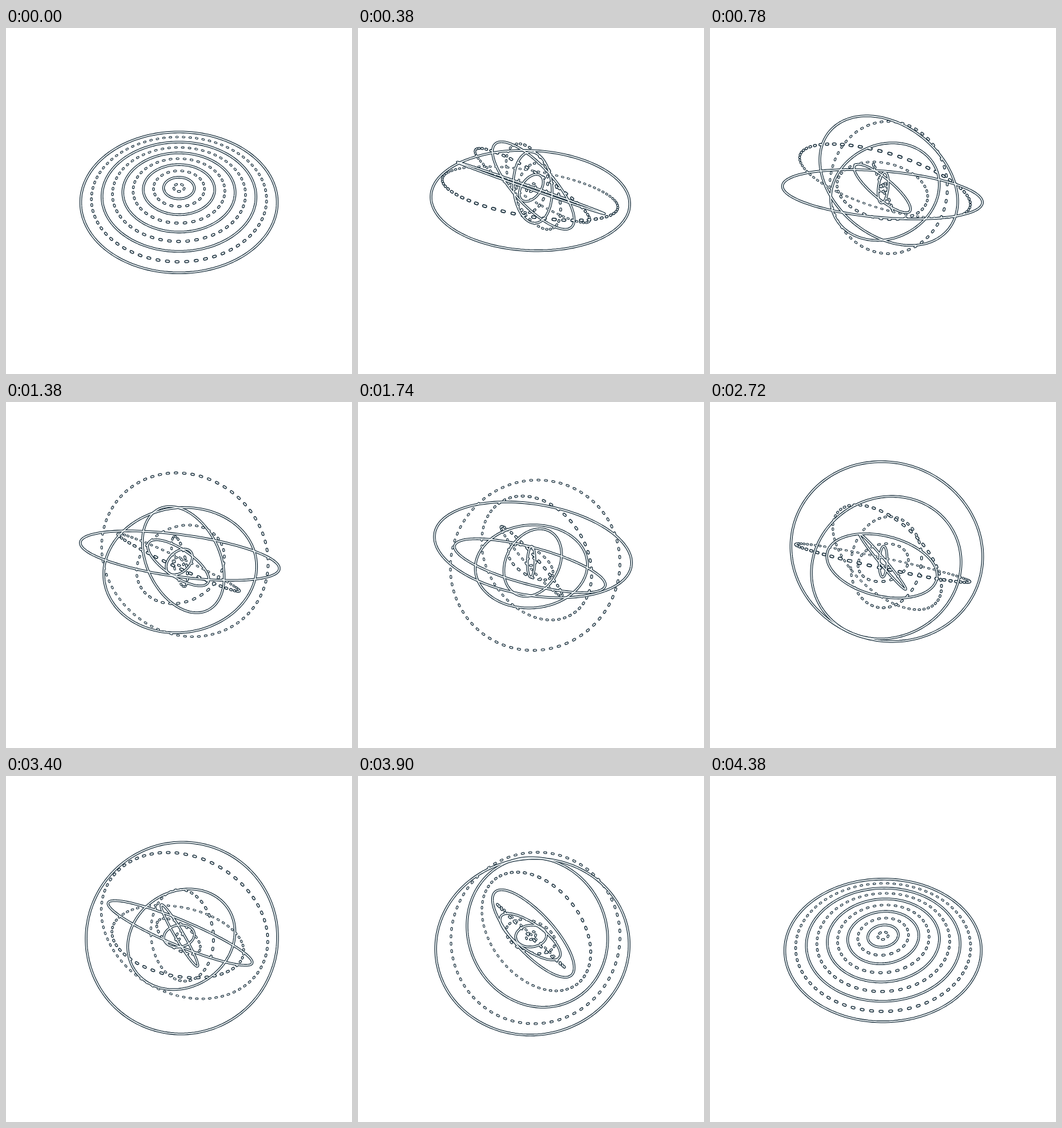
Recreate the animation shown at these times as an HTML page with a canvas. Size 540 px wide and 540 px high, loop 4.4 s.

```html
<!DOCTYPE html>
<html lang="en">
<head>
<meta charset="utf-8">
<title>Turning rings</title>
<style>
html, body { margin: 0; width: 100%; height: 100%; overflow: hidden; background: #fff; }
canvas { display: block; }
</style>
</head>
<body>
<canvas id="stage" width="540" height="540"></canvas>
<script>
const ctx = document.getElementById('stage').getContext('2d');
const TAU = Math.PI * 2, LOOP = 4400, RINGS = 10;
const CX = 270, CY = 249.2, CAMERA = 510;
const TILT = 45.5 * Math.PI / 180, SIN = Math.sin(TILT), COS = Math.cos(TILT);
const LAYERS = [{ color: '#0c2230', width: 3.9 }, { color: '#f1f6f7', width: 1.8 }];

// Ring k makes k half turns per loop about an axis in its own plane,
// and that axis is swung by 9° more from ring to ring.
function makeRing(k) {
  const swing = k * Math.PI / 20;
  return {
    k,
    radius: 150 - 15.75 * (k - 1),
    ca: Math.cos(swing),
    sa: Math.sin(swing),
    dots: k % 2 ? 0 : 5 + 8 * (RINGS - k)
  };
}

const rings = Array.from({ length: RINGS }, (_, i) => makeRing(i + 1));

function project(ring, turn, angle) {
  const u = ring.radius * Math.cos(angle), side = ring.radius * Math.sin(angle);
  const v = side * Math.cos(turn), lift = side * Math.sin(turn);
  const x = u * ring.ca - v * ring.sa;
  const front = u * ring.sa + v * ring.ca;
  const scale = 1 / (1 - (lift * COS + front * SIN) / CAMERA);
  return { x: CX + x * scale, y: CY + (front * COS - lift * SIN) * scale, scale };
}

function drawSolid(ring, turn, width) {
  const steps = 180;
  ctx.beginPath();
  for (let i = 0; i < steps; i++) {
    const p = project(ring, turn, TAU * i / steps);
    ctx.lineTo(p.x, p.y);
  }
  ctx.closePath();
  ctx.lineWidth = width;
  ctx.stroke();
}

function drawDots(ring, turn, width) {
  const half = 1.2 / ring.radius;
  for (let i = 0; i < ring.dots; i++) {
    const angle = TAU * i / ring.dots;
    const a = project(ring, turn, angle - half);
    const b = project(ring, turn, angle + half);
    ctx.beginPath();
    ctx.moveTo(a.x, a.y);
    ctx.lineTo(b.x, b.y);
    ctx.lineWidth = width * a.scale;
    ctx.stroke();
  }
}

function draw() {
  const phase = performance.now() % LOOP / LOOP;
  ctx.fillStyle = '#fff';
  ctx.fillRect(0, 0, 540, 540);
  ctx.lineCap = ctx.lineJoin = 'round';
  for (const { color, width } of LAYERS) {
    ctx.strokeStyle = color;
    for (const ring of rings) {
      const turn = phase * ring.k * Math.PI;
      (ring.dots ? drawDots : drawSolid)(ring, turn, width);
    }
  }
  requestAnimationFrame(draw);
}

draw();
</script>
</body>
</html>
```
